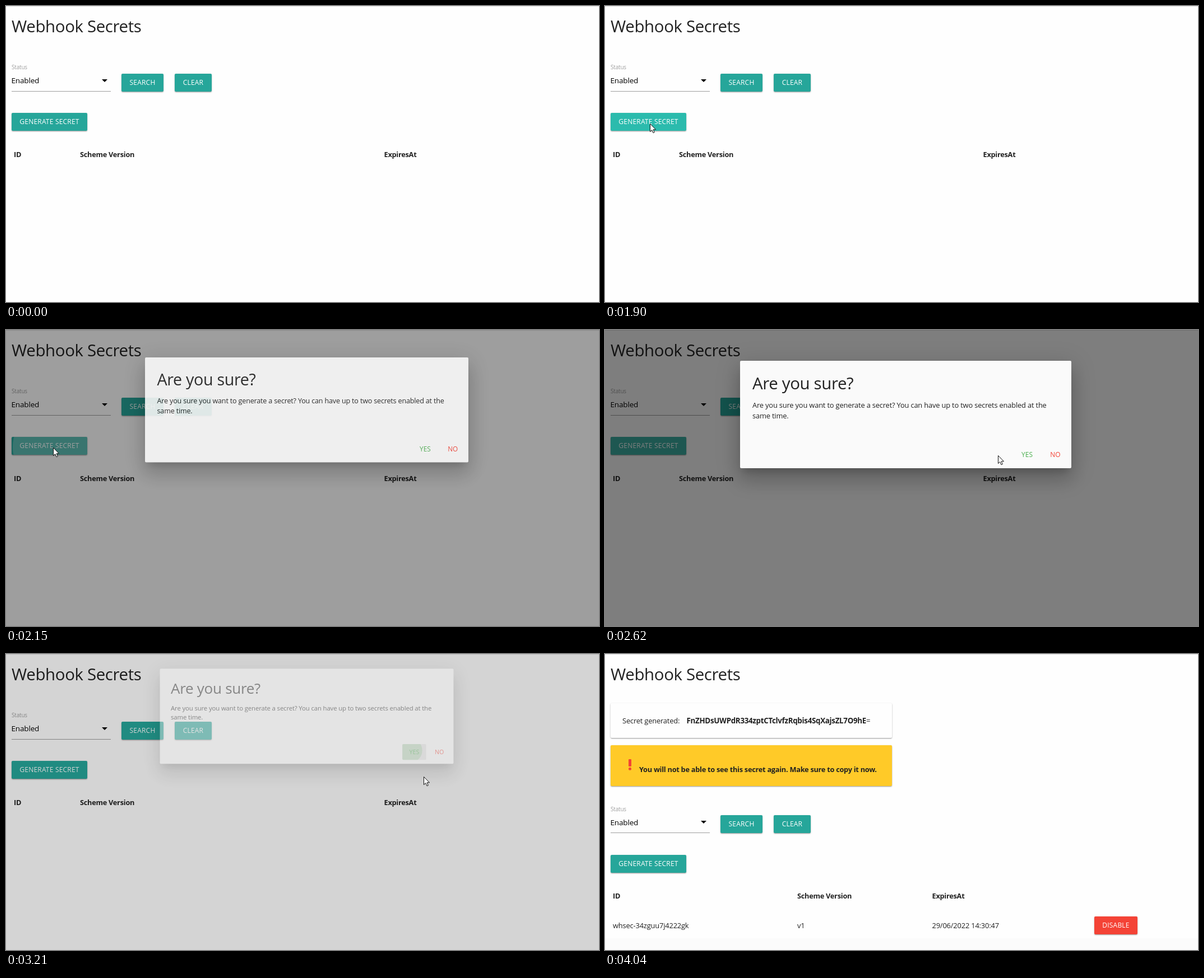
Recreate the animation shown at these times as an HTML page. Size 1058 by 529 pixels, loop 5.21 s.

```html
<!DOCTYPE html>
<html lang="en">
<head>
<meta charset="utf-8">
<title>Webhook Secrets</title>
<style>
html, body { margin: 0; width: 100%; height: 100%; overflow: hidden; background: #fefefe; }
#stage { position: absolute; left: 0; top: 0; width: 1058px; height: 529px; overflow: hidden;
  background: #fefefe; color: #212121; font-family: "Open Sans", "Noto Sans", sans-serif; }
#stage div, #stage span, #stage svg { position: absolute; }
#stage span { line-height: 0; white-space: pre; letter-spacing: -.012em; }
#stage span.bold { font-weight: 700; letter-spacing: -.02em; }
.box { border-radius: 2px; overflow: hidden; }
.card { box-shadow: 0 1px 2px rgba(0,0,0,.18), 0 2px 1px -1px rgba(0,0,0,.12), 0 1px 3px rgba(0,0,0,.16); }
.btn { background: #26a69a; }
#stage .box > span { left: 0; width: 100%; text-align: center; font-size: 12px; letter-spacing: .2px; }
.btn > span { color: #fff; }
#stage .flat > span { letter-spacing: 0; }
.ripple { border-radius: 50%; }
#topline { width: 1058px; height: 1px; background: #e0e0e0; box-shadow: 0 1px 2px rgba(0,0,0,.03); }
#overlay { inset: 0; background: #000; }
#modal { left: 241px; top: 55px; width: 591px; height: 192px; background: #fafafa; border-radius: 2px;
  box-shadow: 0 22px 34px 3px rgba(0,0,0,.14), 0 8px 41px 7px rgba(0,0,0,.12), 0 10px 14px -6px rgba(0,0,0,.2); }
</style>
</head>
<body>
<div id="stage"></div>
<script>
const LOOP = 5210;
const RED = '#f44336', GREEN = '#4caf50';
const stage = document.getElementById('stage');

function add(parent, tag, props = {}, style = {}) {
  const el = document.createElement(tag);
  Object.assign(el, props);
  Object.assign(el.style, style);
  return parent.appendChild(el);
}
const px = n => n + 'px';
const group = (parent, id) => add(parent, 'div', { id });

// Places text by its baseline; .388em is where it sits in a zero-height line.
function text(parent, str, x, baseline, size = 12.84, style = {}, className = '') {
  return add(parent, 'span', { textContent: str, className },
    { left: px(x), top: px(baseline - size * .388), fontSize: px(size), ...style });
}
const bold = (parent, str, x, baseline, size = 12.75) =>
  text(parent, str, x, baseline, size, {}, 'bold');

function box(parent, className, x, y, w, h, style) {
  return add(parent, 'div', { className: 'box ' + className },
    { left: px(x), top: px(y), width: px(w), height: px(h), ...style });
}
function button(parent, className, label, x, y, w, style) {
  const el = box(parent, className, x, y, w, 32, style);
  add(el, 'span', { textContent: label }, { top: px(16.1) });
  return el;
}
function svg(parent, x, y, w, h, shapes) {
  const el = add(parent, 'div', {}, { left: px(x), top: px(y) });
  el.innerHTML = `<svg width="${w}" height="${h}" style="overflow:visible">${shapes}</svg>`;
  return el;
}

// Filter row, generate button and table head, shared by both views
function panel(parent, dy, columns) {
  text(parent, 'Status', 10, 113 + dy, 9.9, { color: '#9e9e9e' });
  text(parent, 'Enabled', 9.5, 138.2 + dy, 13.5, { color: '#000' });
  svg(parent, 171, Math.floor(131 + dy), 11, 6, '<path d="M0 0H10L5 5Z"/>');
  add(parent, 'div', {}, { left: px(10), top: px(Math.floor(152 + dy)), width: px(177), height: px(1), background: '#9e9e9e' });
  const top = Math.floor(121 + dy);
  button(parent, 'btn card', 'SEARCH', 206, top, 75);
  button(parent, 'btn card', 'CLEAR', 301, top, 66);
  const generate = button(parent, 'btn card', 'GENERATE SECRET', 10, Math.round(191 + dy), 135);
  ['ID', 'Scheme Version', 'ExpiresAt'].forEach((name, i) => bold(parent, name, columns[i], 269.8 + dy));
  return generate;
}

add(stage, 'div', { id: 'topline' });
text(stage, 'Webhook Secrets', 10, 47.8, 29.4);

const before = group(stage, 'before');
const generate = panel(before, 0, [14, 132, 674.5]);

const after = group(stage, 'after');
box(after, '', 0, 508, 1058, 21, { background: '#fbfbfb', borderRadius: 0 });
box(after, 'card', 10, 88, 502, 62, { background: '#fefefe' });
text(after, 'Secret generated:', 31, 124.2);
const secret = bold(after, 'FnZHDsUWPdR334zptCTclvfzRqbis4SqXajsZL7O9hE', 145.5, 124.2, 13.3);
add(secret, 'span', { textContent: '=' }, { position: 'static', fontWeight: 400 });
box(after, 'card', 10, 163, 502, 73, { background: '#ffca28' });
svg(after, 42, 188, 5, 20,
  `<g fill="${RED}"><rect width="5" height="13" rx="1"/><circle cx="2.5" cy="17.2" r="2.5"/></g>`);
bold(after, 'You will not be able to see this secret again. Make sure to copy it now.', 61, 210.8);
panel(after, 167.6, [14, 343, 583.5]);
text(after, 'whsec-34zguu7j4222gk', 14, 490);
text(after, 'v1', 343, 490);
text(after, '29/06/2022 14:30:47', 583.5, 490);
button(after, 'btn card', 'DISABLE', 873, 469, 77, { background: RED });

const overlay = group(stage, 'overlay');
const modal = group(stage, 'modal');
text(modal, 'Are you sure?', 22, 51.2, 29.4);
text(modal, 'Are you sure you want to generate a secret? You can have up to two secrets enabled at the', 22, 83.5);
text(modal, 'same time.', 22, 103);
const yes = button(modal, 'flat', 'YES', 488, 152, 48, { color: GREEN });
button(modal, 'flat', 'NO', 538, 152, 49, { color: RED });

const ripple = (parent, background) => add(parent, 'div', { className: 'ripple' }, { background });
const generateRipple = ripple(generate, '#fff');
const yesRipple = ripple(yes, GREEN);

const cursor = svg(stage, 0, 0, 12, 18,
  '<path d="M.5 .5V14.6L3.7 11.6L6 16.8L8.3 15.8L6.1 10.8H10.5Z" fill="#fff" stroke="#111" stroke-width="1"/>');

// time, x, y of the pointer tip
const POINTER = [
  [1160, 94, 527], [1280, 91, 460], [1450, 82, 340], [1660, 70, 243], [1760, 74, 222],
  [1900, 80, 210], [2070, 81, 210], [2150, 83, 210], [2190, 110, 218], [2240, 212, 238],
  [2400, 430, 250], [2620, 701, 224], [2770, 739, 220], [2830, 745, 219], [3390, 745, 219],
  [3480, 752, 240], [3540, 764, 272], [3700, 822, 345], [3880, 905, 445], [4035, 968, 530]
];

const ramp = (t, from, to) => Math.min(1, Math.max(0, (t - from) / (to - from)));
const easeOut = (u, power) => 1 - (1 - u) ** power;

function pointerAt(t) {
  const i = POINTER.findIndex(k => k[0] > t);
  if (i < 1) return null;
  const [t0, x0, y0] = POINTER[i - 1], [t1, x1, y1] = POINTER[i];
  const u = ramp(t, t0, t1);
  return [x0 + (x1 - x0) * u, y0 + (y1 - y0) * u];
}

function setRipple(el, x, y, radius, opacity) {
  Object.assign(el.style, {
    left: px(x - radius), top: px(y - radius),
    width: px(2 * radius), height: px(2 * radius), opacity
  });
}

function mix(a, b, u) {
  return `rgb(${a.map((v, i) => v + (b[i] - v) * u).join()})`;
}

function render(t) {
  const opening = ramp(t, 2024, 2274), closing = ramp(t, 3150, 3400);
  const shown = easeOut(opening, 3) * (1 - easeOut(closing, 3));
  overlay.style.opacity = .5 * easeOut(opening, 2) * (1 - easeOut(closing, 4));
  modal.style.display = shown > 0 ? '' : 'none';
  modal.style.opacity = shown;
  modal.style.transform = `translateY(${-70 * (1 - shown)}px) scale(${.8 + .2 * shown})`;

  const hover = ramp(t, 1720, 1900) - ramp(t, 1980, 2100);
  generate.style.background = mix([38, 166, 154], [43, 187, 173], hover);
  const press = easeOut(ramp(t, 1920, 2620), 2);
  const light = .45 * press * (1 - ramp(t, 2170, 2290));
  const rest = .1 * ramp(t, 2170, 2290) * (1 - ramp(t, 3040, 3150));
  setRipple(generateRipple, 70.5, 18, 124 * press, light + rest);

  const yesPress = easeOut(ramp(t, 3040, 3740), 2);
  yes.style.background = t >= 3040 ? 'rgba(0,0,0,.1)' : 'none';
  setRipple(yesRipple, 16, 13, 55 * yesPress, .7 * yesPress);

  const loaded = t >= 3490;
  before.style.display = loaded ? 'none' : '';
  after.style.display = loaded ? '' : 'none';

  const tip = pointerAt(t);
  cursor.style.display = tip ? '' : 'none';
  if (tip) cursor.style.transform = `translate(${Math.round(tip[0])}px, ${Math.round(tip[1])}px)`;
}

const start = performance.now();
function tick() {
  render((performance.now() - start) % LOOP);
  requestAnimationFrame(tick);
}
tick();
</script>
</body>
</html>
```
